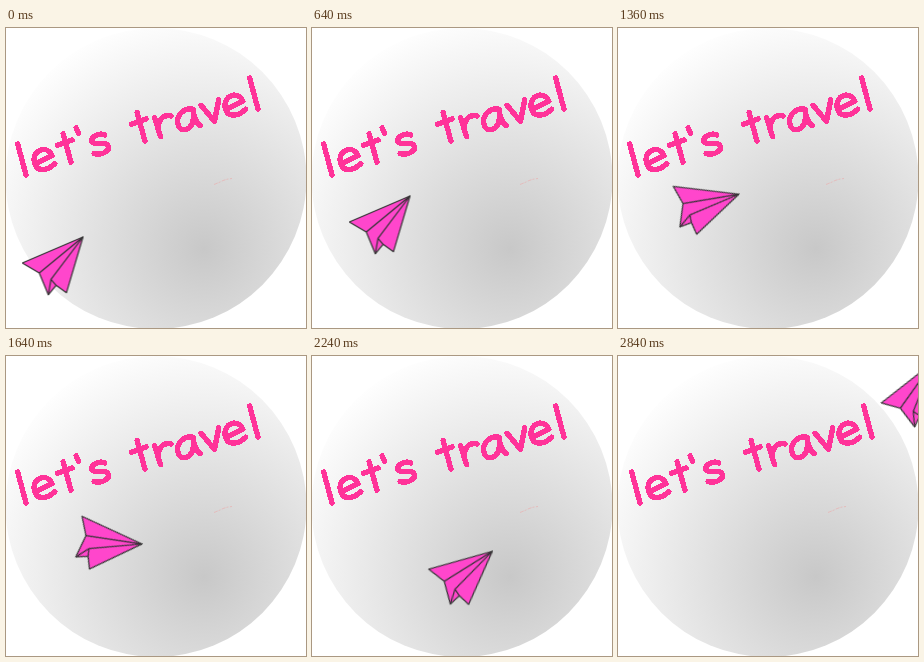
Write an HTML page that moves like this. It is 300 by 300 pixels and loops after 2880 ms.

```html
<!DOCTYPE html>
<html lang="en">
<head>
<meta charset="utf-8">
<title>let's travel</title>
<style>
  html, body { margin: 0; width: 100%; height: 100%; overflow: hidden; background: #fff; }
  svg { display: block; width: 100%; height: 100%; }

  .plane, .lettering { animation: 2880ms -1ms infinite; }
  .plane { animation-name: fly; fill: #ff46cc; stroke: #333; stroke-width: 1.2; stroke-linejoin: round; }
  .lettering { animation-name: nudge; animation-timing-function: step-end; }
  .strokes { fill: none; stroke: #ff3399; stroke-width: 5.4; stroke-linecap: round; stroke-linejoin: round; shape-rendering: crispEdges; }
  .scratch { fill: none; stroke: #e6b9b9; stroke-width: .9; stroke-dasharray: 4 1 2 1.5; }

  /* One step every 40 ms */
  @keyframes fly {
    0%      { transform: translate(46.5px, 238px) rotate(0deg);      animation-timing-function: steps(24); }
    33.333% { transform: translate(78px, 176.5px) rotate(0deg);      animation-timing-function: steps(15); }
    54.167% { transform: translate(80.9px, 175.9px) rotate(45deg);   animation-timing-function: steps(10); }
    68.056% { transform: translate(146.4px, 220.1px) rotate(60deg);  animation-timing-function: steps(10); }
    81.944% { transform: translate(146.2px, 220.1px) rotate(-15deg); animation-timing-function: steps(13); }
    100%    { transform: translate(305.5px, 27.2px) rotate(-15deg); }
  }
  @keyframes nudge {
    0%      { transform: none; }
    98.611% { transform: translate(2px, 0); }
    100%    { transform: translate(2px, 0); }
  }
</style>
</head>
<body>
<svg viewBox="0 0 300 300" role="img" aria-label="let's travel">
  <defs>
    <radialGradient id="shade" gradientUnits="userSpaceOnUse" cx="198" cy="221" r="240">
      <stop offset="0" stop-color="#c8c8c8"/>
      <stop offset="1" stop-color="#fff"/>
    </radialGradient>
    <path id="l" d="M.5-32L0 0"/>
    <path id="e" d="M-9-8.5L8.5-11.5C8-17 4-20 0-20C-7-20-10.5-14-10.2-8C-9.8 0 0 2 9-3"/>
    <path id="t" d="M0-29.5L-.3 0M-8.5-20L7-21"/>
  </defs>

  <circle cx="150" cy="150.5" r="150.5" fill="url(#shade)"/>

  <g class="lettering">
    <g class="strokes" transform="translate(20 147) rotate(-15.9)">
      <use href="#l"/>
      <use href="#e" x="21.7"/>
      <use href="#t" x="47"/>
      <path d="M61.2-31.5L62-26"/>
      <path d="M86.5-17C82-21 72.5-19 72.5-14.5C72.5-9 87-11.5 87-5C87 1 76 1.5 71.5-2"/>
      <use href="#t" x="124"/>
      <path d="M139.3-20L140 0M140-10C143-17 149-21 155.5-17"/>
      <path d="M178.5-17.5C171-22 160.5-16 160-8C159.5 1 168 2 173-3C176-6 178-11 178.5-17.5C177.5-10 178-4 181 0"/>
      <path d="M187.5-19L196 0L206-19.5"/>
      <use href="#e" x="220.2"/>
      <use href="#l" x="241.2"/>
    </g>
    <path class="scratch" d="M208 156.5L213 154.5L217 152.5L222 151L226 150.5"/>
  </g>

  <g class="plane">
    <path d="M30.5-29L-30.2-3L-13.2 7L-4.2 28.8L3.6 19.3L14 26.7Z"/>
    <path fill="none" d="M-13.2 7L30.5-29L-1.5 13.4L-4.2 28.8M-1.5 13.4L3.6 19.3"/>
  </g>
</svg>
</body>
</html>
```
